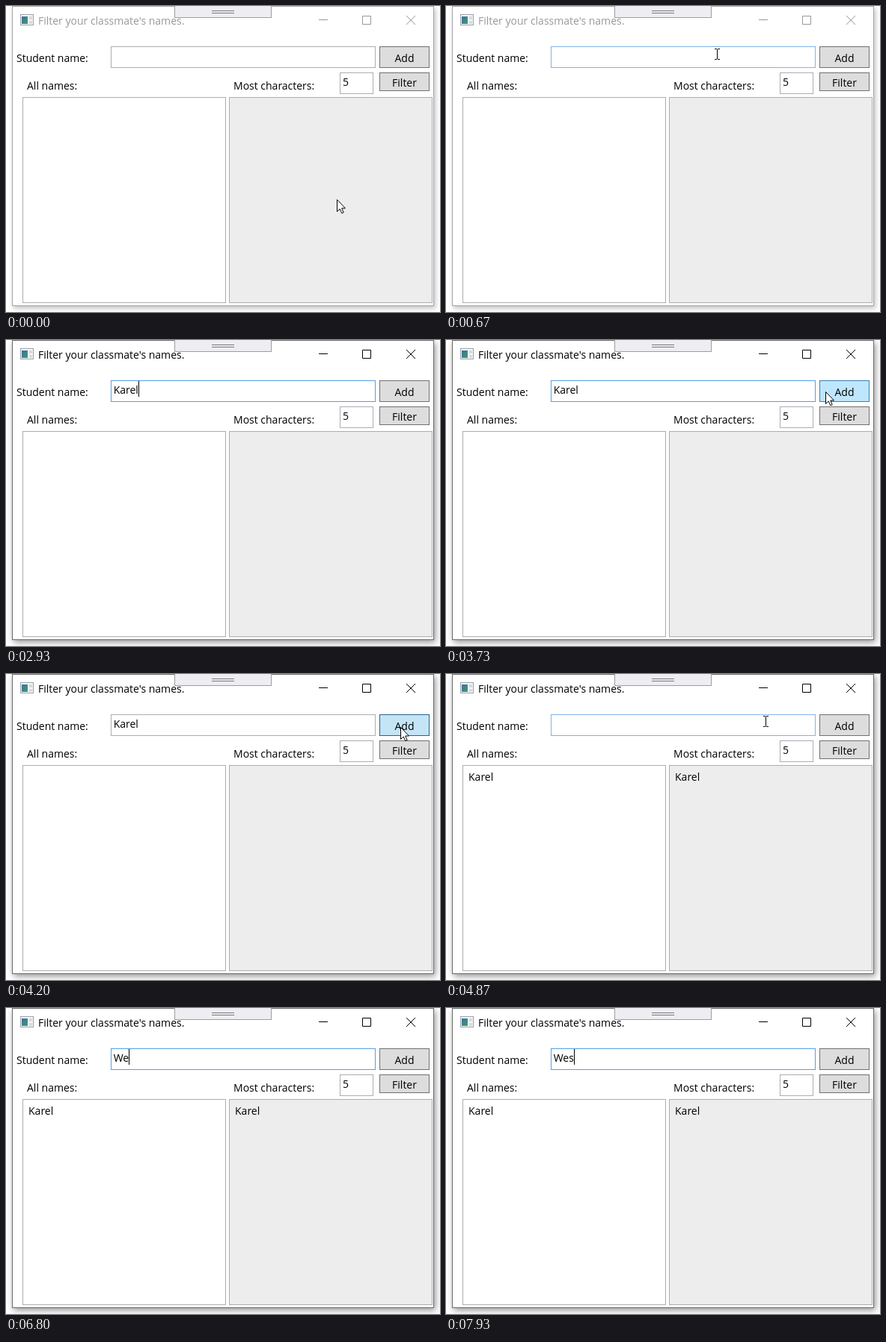
Animation of 580 by 410 pixels, one loop 8000 ms. Source, as an HTML page:

```html
<!DOCTYPE html>
<html lang="en">
<head>
<meta charset="utf-8">
<title>Name filter</title>
<style>
  html, body { margin: 0; width: 100%; height: 100%; overflow: hidden; background: #fff; }
  svg { display: block; width: 580px; height: 410px; }
  text { font: 14px "Open Sans", "Noto Sans", sans-serif; fill: #000; }
  .mid { text-anchor: middle; }
  .field { fill: #fff; stroke: #abadb3; }
  .button { fill: #ddd; stroke: #707070; }
  .button.hover { fill: #bee6fd; stroke: #3c7fb1; }
  .button.pressed { fill: #c4e5f6; stroke: #2c628b; }
  .field.hover { stroke: #7eb4ea; }
  .field.focus { stroke: #569de5; }
  .frame { fill: #fff; stroke: #a6a6a6; filter: drop-shadow(2px 3px 3px rgba(0, 0, 0, .25)); }
  .chrome { fill: none; stroke: #999; }
  .title { fill: #999; }
  .active .frame { stroke: #6a6a6a; filter: drop-shadow(2px 3px 4px rgba(0, 0, 0, .42)); }
  .active .chrome { stroke: #000; }
  .active .title { fill: #000; }
</style>
</head>
<body>
<svg id="stage" viewBox="0 0 580 410">
  <defs>
    <linearGradient id="pane" x2="1" y2="1">
      <stop offset="0" stop-color="#3c6fa5"/>
      <stop offset="1" stop-color="#3f9a6c"/>
    </linearGradient>
  </defs>

  <rect class="frame" x="8.5" y=".5" width="563" height="401"/>
  <g>
    <rect x="19.5" y="11.5" width="17" height="14" fill="#f4f6f8" stroke="#9aa3ab"/>
    <rect x="21" y="14" width="8" height="10" fill="url(#pane)"/>
    <path d="M31 14h4v4h-4zM31 20h4v4h-4z" fill="#d3dae0"/>
  </g>
  <text class="title" x="43" y="25">Filter your classmate's names.</text>
  <path class="chrome" d="M418 18.5h12M476.5 13.5h11v11h-11zM535 13l12 12M547 13l-12 12"/>
  <rect x="225.5" y="-.5" width="129" height="16" fill="#eeeef2" stroke="#9b9ba3"/>
  <path d="M275 6.5h30M275 9.5h30" stroke="#77777d"/>

  <text x="14" y="75">Student name:</text>
  <text x="28" y="112">All names:</text>
  <text x="304" y="112">Most characters:</text>

  <rect id="input" class="field" x="140.5" y="54.5" width="353" height="28"/>
  <text id="typed" x="143.7" y="72"></text>
  <rect id="caret" y="55" width="1" height="21"/>

  <rect id="add" class="button" x="499.5" y="54.5" width="66" height="28"/>
  <text class="mid" x="532.5" y="75">Add</text>
  <rect class="field" x="446.5" y="89.5" width="44" height="28"/>
  <text x="450" y="107">5</text>
  <rect class="button" x="499.5" y="89.5" width="66" height="24"/>
  <text class="mid" x="532.5" y="108">Filter</text>

  <rect class="field" x="22.5" y="122.5" width="271" height="275"/>
  <rect x="298.5" y="122.5" width="271" height="275" fill="#ededed" stroke="#abadb3"/>
  <g id="names">
    <text x="30" y="143">Karel</text>
    <text x="306" y="143">Karel</text>
  </g>

  <path id="arrow" d="M.5.5V16.5L4.2 13L6.8 18.7L9.2 17.6L6.7 12H11.5Z" fill="#fff" stroke="#000"/>
  <path id="beam" d="M-3-6.5h3M1-6.5h3M.5-6V7M-3 7.5h3M1 7.5h3" fill="none" stroke="#000"/>
</svg>

<script>
const $ = id => document.getElementById(id);
const LOOP = 8000, TICK = 1000 / 15;

// Timelines: [tick, value], each value holds until the next entry.
const text = [[0, ""], [36, "K"], [40, "Ka"], [41, "Kar"], [42, "Kare"], [44, "Karel"],
  [65, ""], [99, "W"], [102, "We"], [106, "Wed"], [107, "Weds"], [112, "Wed"],
  [114, "We"], [119, "Wes"]];
const caretOn = [[0, 0], [20, 1], [29, 0], [36, 1], [53, 0], [60, 1], [63, 0],
  [78, 1], [87, 0], [94, 1]];
const focused = [[0, 0], [20, 1], [63, 0], [78, 1]];
const pointerOn = [[0, 1], [36, 0], [53, 1], [98, 0]];

// Pointer moves: [first tick, last tick, from, to, easing].
const smooth = p => p * p * (3 - 2 * p);
const easeOut = p => 1 - (1 - p) ** 2.2;
const moves = [
  [0, 10, [442, 259], [362, 64], smooth],
  [52, 56, [362, 64], [507, 69], smooth],
  [56, 60, [507, 69], [527, 71], easeOut],
  [71, 73, [527, 71], [427, 63], p => p],
  [73, 74, [427, 63], [395, 64], p => p]
];

const at = (line, tick) => line.filter(e => e[0] <= tick).pop()[1];
const show = (el, on) => el.setAttribute("visibility", on ? "visible" : "hidden");

function pointerAt(tick) {
  const [a, b, from, to, ease] = moves.filter(m => m[0] <= tick).pop();
  const p = ease(Math.min(1, (tick - a) / (b - a)));
  return from.map((v, i) => Math.round(v + (to[i] - v) * p));
}

function draw(tick) {
  const [x, y] = pointerAt(tick);
  const visible = at(pointerOn, tick);
  const inRow = visible && y >= 54 && y < 83;
  const overInput = inRow && x >= 140 && x < 494;
  const overAdd = inRow && x >= 499 && x < 566;
  const focus = at(focused, tick);
  const pressed = tick >= 63 && tick < 65;

  $("stage").classList.toggle("active", tick >= 20);
  $("input").setAttribute("class", "field" + (focus ? " focus" : overInput ? " hover" : ""));
  $("add").setAttribute("class", "button" + (pressed ? " pressed" : overAdd ? " hover" : ""));

  const typed = $("typed");
  typed.textContent = at(text, tick);
  const width = typed.textContent ? typed.getComputedTextLength() : 0;
  $("caret").setAttribute("x", Math.round(143.4 + width));
  show($("caret"), at(caretOn, tick));
  show($("names"), tick >= 65);

  for (const id of ["arrow", "beam"]) {
    $(id).setAttribute("transform", `translate(${x} ${y})`);
    show($(id), visible && (id === "beam") === !!overInput);
  }
}

const start = performance.now();
let last = -1;
function loop() {
  const t = (performance.now() - start) % LOOP;
  const tick = Math.min(119, Math.floor((t + 3.4) / TICK));
  if (tick !== last) draw(last = tick);
  requestAnimationFrame(loop);
}
loop();
</script>
</body>
</html>
```
